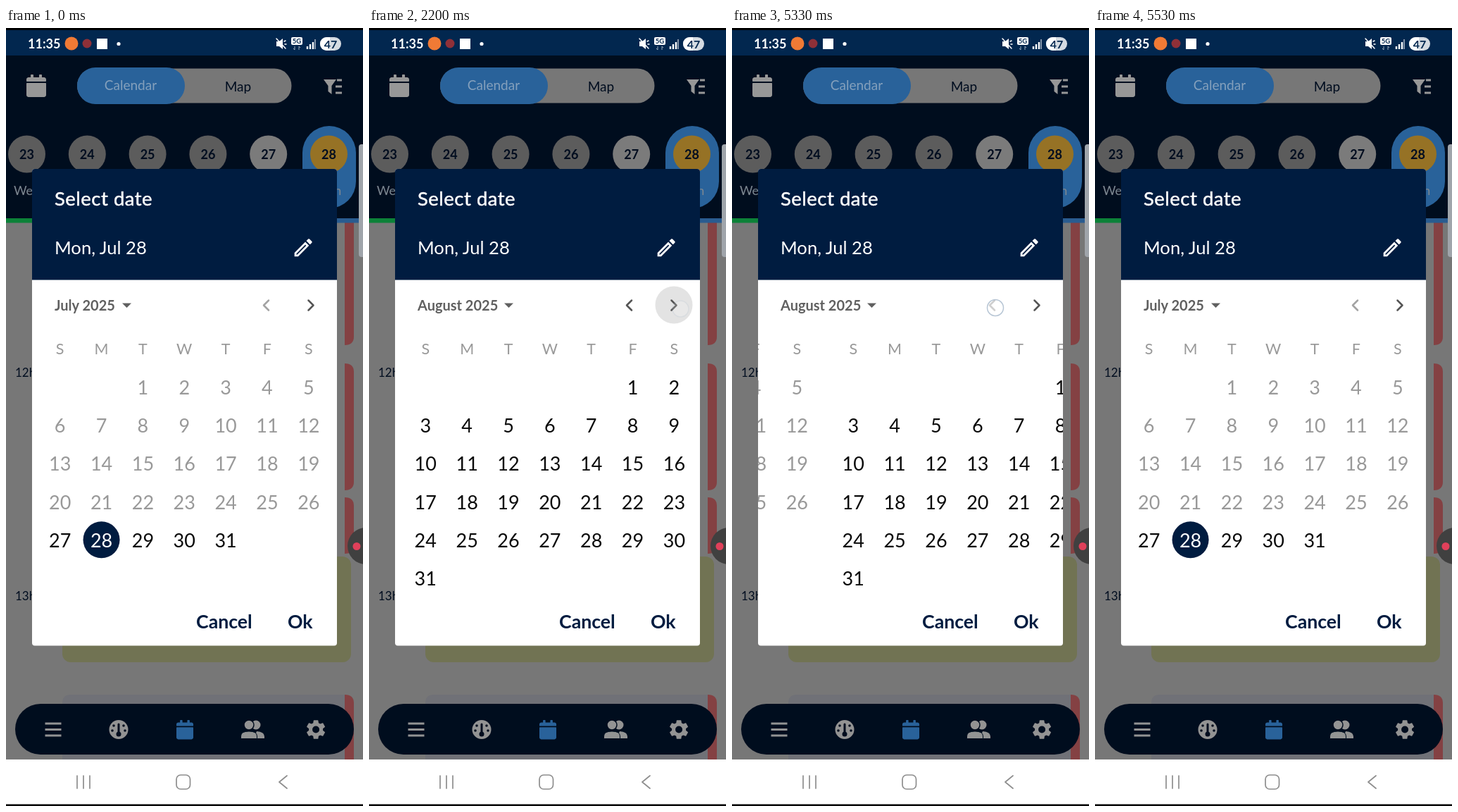
Animation, 507 px wide and 1104 px high, one loop 7200 ms. Source, as an HTML page:

```html
<!DOCTYPE html>
<html lang="en">
<head>
<meta charset="utf-8">
<title>Date picker</title>
<style>
  html, body { margin: 0; width: 100%; height: 100%; overflow: hidden; background: #000; }
  svg { display: block; width: 100%; height: 100%; font-family: Lato, "Open Sans", sans-serif; }
  .b { font-weight: bold; }
  .m { text-anchor: middle; }
  .line { fill: none; stroke-linecap: round; stroke-linejoin: round; }
</style>
</head>
<body>
<svg viewBox="0 0 507 1104">
  <defs>
    <path id="cal" d="M12 192h424c6.600 0 12 5.400 12 12v260c0 26.500-21.500 48-48 48H48c-26.500 0-48-21.500-48-48V204c0-6.600 5.400-12 12-12zm436-44v-36c0-26.500-21.500-48-48-48h-48V12c0-6.600-5.400-12-12-12h-40c-6.600 0-12 5.400-12 12v52H160V12c0-6.600-5.400-12-12-12h-40c-6.600 0-12 5.400-12 12v52H48C21.500 64 0 85.500 0 112v36c0 6.600 5.400 12 12 12h424c6.600 0 12-5.400 12-12z"/>
    <clipPath id="page"><rect x="37" y="430" width="433" height="380"/></clipPath>
  </defs>

  <!-- dimmed screen -->
  <rect y="39" width="507" height="999" fill="#777"/>
  <g fill="#844143">
    <path d="M481 276h13v162q0 12-13 12z"/>
    <path d="M481 476q13 0 13 12v156q0 12-13 12z"/>
    <path d="M481 666q13 0 13 12v56q0 12-13 12z"/>
  </g>
  <rect x="80" y="750" width="410" height="150" rx="12" fill="#717353"/>
  <path d="M80 1038V958q0-12 12-12h389v92z" fill="#707177"/>
  <path d="M481 946q13 0 13 12v80h-13z" fill="#844143"/>
  <g font-size="17" fill="#000d1f"><text x="13" y="495">12h</text><text x="13" y="812">13h</text></g>

  <rect y="39" width="507" height="232" fill="#000d1e"/>
  <rect y="270" width="254" height="6.500" fill="#0c8238"/>
  <rect x="254" y="270" width="253" height="6.500" fill="#2a5c90"/>
  <rect x="101" y="57.500" width="304.500" height="49" rx="24.500" fill="#777"/>
  <rect x="101" y="56" width="153" height="52" rx="26" fill="#29629a"/>
  <g class="m" font-size="19">
    <text x="177" y="88" fill="#84a0bc">Calendar</text>
    <text x="329.500" y="90" fill="#000d1f">Map</text>
  </g>
  <use href="#cal" transform="translate(29 66) scale(.0625)" fill="#979797"/>
  <path d="M451 73h18l-6.500 9v12l-5-4v-8z" fill="#979797"/>
  <path d="M470 74h7M468 83h9M468 92h9" stroke="#979797" stroke-width="3"/>
  <rect x="421" y="139" width="76" height="117" rx="38" fill="#29629a"/>
  <g id="strip" class="m b" font-size="18" fill="#000d1f"></g>
  <g font-size="18" fill="#7d8791"><text x="11" y="237">Wed</text><text class="m" x="458" y="237">Mon</text></g>
  <rect x="501" y="165" width="10" height="160" rx="4" fill="#a0a5ab"/>

  <rect x="13" y="959" width="481" height="72" rx="36" fill="#000d1e"/>
  <path d="M55.500 987h23M55.500 995.500h23M55.500 1004h23" stroke="#939393" stroke-width="3"/>
  <circle cx="160" cy="995.500" r="13.500" fill="#939393"/>
  <path class="line" d="M160 988v12" stroke="#000d1e" stroke-width="3"/>
  <g fill="#000d1e">
    <circle cx="160" cy="1002" r="3.500"/><circle cx="153" cy="990" r="1.800"/><circle cx="167" cy="990" r="1.800"/>
    <circle cx="151" cy="997" r="1.800"/><circle cx="169" cy="997" r="1.800"/>
  </g>
  <use href="#cal" transform="translate(242 982) scale(.0536)" fill="#29629a"/>
  <g fill="#939393">
    <circle cx="355" cy="989" r="6.500"/>
    <path d="M352 1008h15v-3q0-6-11-7z"/>
    <circle cx="345" cy="989" r="7" stroke="#000d1e" stroke-width="1.500"/>
    <path d="M333.500 1008.500v-3.500q0-7 11.500-7t11.500 7v3.500z" stroke="#000d1e"/>
    <path transform="translate(423.400 978.800) scale(1.390)" d="M19.140 12.940c.04-.3.06-.61.06-.94 0-.32-.02-.64-.07-.94l2.030-1.580c.18-.14.23-.41.12-.61l-1.920-3.320c-.12-.22-.37-.29-.59-.22l-2.390.96c-.5-.38-1.030-.7-1.620-.94l-.36-2.540c-.04-.24-.24-.41-.48-.41h-3.840c-.24 0-.43.17-.47.41l-.36 2.540c-.59.24-1.130.57-1.620.94l-2.390-.96c-.22-.08-.47 0-.59.22L2.740 8.870c-.12.21-.08.47.12.61l2.030 1.580c-.05.3-.09.63-.09.94s.02.64.07.94l-2.030 1.580c-.18.14-.23.41-.12.61l1.920 3.320c.12.22.37.29.59.22l2.390-.96c.5.38 1.030.7 1.620.94l.36 2.540c.05.24.24.41.48.41h3.840c.24 0 .44-.17.47-.41l.36-2.540c.59-.24 1.130-.56 1.620-.94l2.390.96c.22.08.47 0 .59-.22l1.920-3.320c.12-.22.07-.47-.12-.61zM12 15.600A3.600 3.600 0 1 1 12 8.400a3.600 3.600 0 0 1 0 7.200z"/>
  </g>
  <circle cx="511" cy="735" r="26" fill="#404040"/>
  <circle cx="498" cy="735.500" r="5.500" fill="#e0405a"/>

  <!-- system bars -->
  <rect width="507" height="39" fill="#02274f"/>
  <rect width="507" height="3"/>
  <text class="b" x="31" y="29" font-size="18" fill="#fff">11:35</text>
  <circle cx="93" cy="22" r="9.500" fill="#f07a35"/>
  <circle cx="115" cy="22" r="6.500" fill="#8f3038"/>
  <rect x="129" y="15" width="15" height="15" fill="#fff"/>
  <circle cx="160" cy="22.500" r="2.600" fill="#fff"/>
  <path d="M384 19h4l5-4v15l-5-4h-4z" fill="#fff"/>
  <path class="line" d="M384 15l13 14M395 19l2-1M396 23h2" stroke="#fff" stroke-width="1.500"/>
  <rect x="405" y="13" width="16" height="11" rx="2" fill="#fff"/>
  <text class="m b" x="413" y="22" font-size="9.500" fill="#02274f">5G</text>
  <path d="M410 26v5M408 29l2 2M416 31v-5M418 28l-2-2" stroke="#9ab" fill="none"/>
  <path d="M428 30v-4M432 30v-7M436 30v-10" stroke="#fff" stroke-width="2.400"/>
  <path d="M439 30v-14" stroke="#8294a8" stroke-width="2"/>
  <rect x="446" y="13" width="30" height="19" rx="9.500" fill="#d5dbe2"/>
  <path d="M460 13h-4.500a9.500 9.500 0 0 0 0 19H460z" fill="#fff"/>
  <text class="m b" x="461" y="28.500" font-size="16" fill="#02274f">47</text>
  <rect y="1038" width="507" height="63.500" fill="#fff"/>
  <g class="line" stroke="#8e8e8e" stroke-width="1.700">
    <path d="M101 1061v18M110 1061v18M119 1061v18M399 1061l-11 9 11 9"/>
    <rect x="242" y="1060" width="19.500" height="20" rx="6"/>
  </g>

  <!-- dialog -->
  <rect x="37" y="200" width="433" height="676.500" rx="4" fill="#fff"/>
  <path d="M37 357.500V204q0-4 4-4h425q4 0 4 4v153.500z" fill="#001c40"/>
  <text x="69" y="252" font-size="27.500" letter-spacing=".5" fill="#fff" stroke="#fff" stroke-width=".5">Select date</text>
  <text x="69" y="321" font-size="25.600" fill="#fff">Mon, Jul 28</text>
  <path transform="translate(405.500 295) scale(1.390)" fill="#fff" d="M14.060 9.020l.92.92L5.920 19H5v-.92l9.060-9.060M17.660 3c-.25 0-.51.1-.7.29l-1.830 1.830 3.750 3.750 1.830-1.830c.39-.39.39-1.020 0-1.410l-2.340-2.340c-.2-.2-.45-.29-.71-.29zm-3.600 3.190L3 17.250V21h3.750L17.810 9.940z"/>
  <text id="title" class="b" x="69" y="401" font-size="20" fill="#606060"></text>
  <path id="drop" d="M0 390.500h13l-6.500 6.500z" fill="#606060"/>
  <circle id="ripple" cx="433" cy="393" r="26.500" fill="#e3e3e3"/>
  <g class="line" stroke-width="2.500">
    <path id="prev" d="M373 386.500l-7 7 7 7"/>
    <path d="M429.500 386.500l7 7-7 7" stroke="#555"/>
  </g>
  <g clip-path="url(#page)" class="m"><g id="july"></g><g id="august"></g></g>
  <g class="b" font-size="26.700" fill="#001c40"><text x="270" y="852">Cancel</text><text x="400" y="852">Ok</text></g>
  <circle id="touch" r="11.500" fill="#fff" fill-opacity=".75" stroke="#b4c3d3" stroke-width="1.500"/>
</svg>
<script>
const LOOP = 7200, PAGE = 433, NAVY = '#001c40';
const $ = id => document.getElementById(id);
const clamp = v => Math.min(1, Math.max(0, v));

function add(parent, tag, attrs, text = '') {
  const el = document.createElementNS('http://www.w3.org/2000/svg', tag);
  for (const key in attrs) el.setAttribute(key, attrs[key]);
  el.textContent = text;
  parent.append(el);
}

for (let i = 0; i < 6; i++) {
  const x = 29.5 + 85.8 * i;
  add($('strip'), 'circle', {cx: x, cy: 179, r: 26.5, fill: i < 4 ? '#5c5c5c' : i < 5 ? '#7b7b7b' : '#967225'});
  add($('strip'), 'text', {x, y: 185.5}, 23 + i);
}

function buildMonth(group, firstCol, firstEnabled, selected) {
  const colX = c => 76.7 + 58.85 * c;
  [...'SMTWTFS'].forEach((d, c) =>
    add(group, 'text', {x: colX(c), y: 462.5, 'font-size': 21.5, fill: '#999'}, d));
  for (let day = 1; day <= 31; day++) {
    const cell = day - 1 + firstCol, x = colX(cell % 7), y = 520 + 54.2 * Math.floor(cell / 7);
    if (day === selected) add(group, 'circle', {cx: x, cy: y - 10.5, r: 26, fill: NAVY});
    const fill = day === selected ? '#fff' : day < firstEnabled ? '#999' : '#0a0a0a';
    add(group, 'text', {x, y, 'font-size': 27, fill}, day);
  }
}
buildMonth($('july'), 2, 27, 28);
buildMonth($('august'), 5, 1);

// cubic-bezier(.25, .1, .25, 1)
function ease(x) {
  if (x <= 0 || x >= 1) return clamp(x);
  const curve = (s, a, b) => 3 * a * s * (1 - s) ** 2 + 3 * b * s * s * (1 - s) + s ** 3;
  let lo = 0, hi = 1;
  for (let i = 0; i < 24; i++) {
    const mid = (lo + hi) / 2;
    if (curve(mid, .25, .25) < x) lo = mid; else hi = mid;
  }
  return curve(lo, .1, 1);
}

function draw(now) {
  // the screen refreshes 15 times a second
  const t = Math.floor((now % LOOP + 5) * 15 / 1000) * 1000 / 15;
  const pos = ease((t - 2024) / 200) - ease((t - 5300) / 200);
  $('july').setAttribute('transform', `translate(${-pos * PAGE})`);
  $('august').setAttribute('transform', `translate(${(1 - pos) * PAGE})`);

  const isAugust = pos > .5;
  $('title').textContent = isAugust ? 'August 2025' : 'July 2025';
  $('drop').setAttribute('transform', `translate(${isAugust ? 192 : 165})`);
  $('prev').setAttribute('stroke', isAugust ? '#555' : '#a3a3a3');

  $('ripple').setAttribute('opacity', Math.min(clamp((t - 2030) / 100), clamp((2530 - t) / 220)));

  const back = t > 4000, since = t - (back ? 5266 : 1999);
  $('touch').setAttribute('transform', back ? 'translate(374 397)' : 'translate(442.5 398.5)');
  $('touch').setAttribute('opacity', since < 0 ? 0 : clamp((240 - since) / 180));
}

const start = performance.now();
(function frame() {
  draw(performance.now() - start);
  requestAnimationFrame(frame);
})();
</script>
</body>
</html>
```
